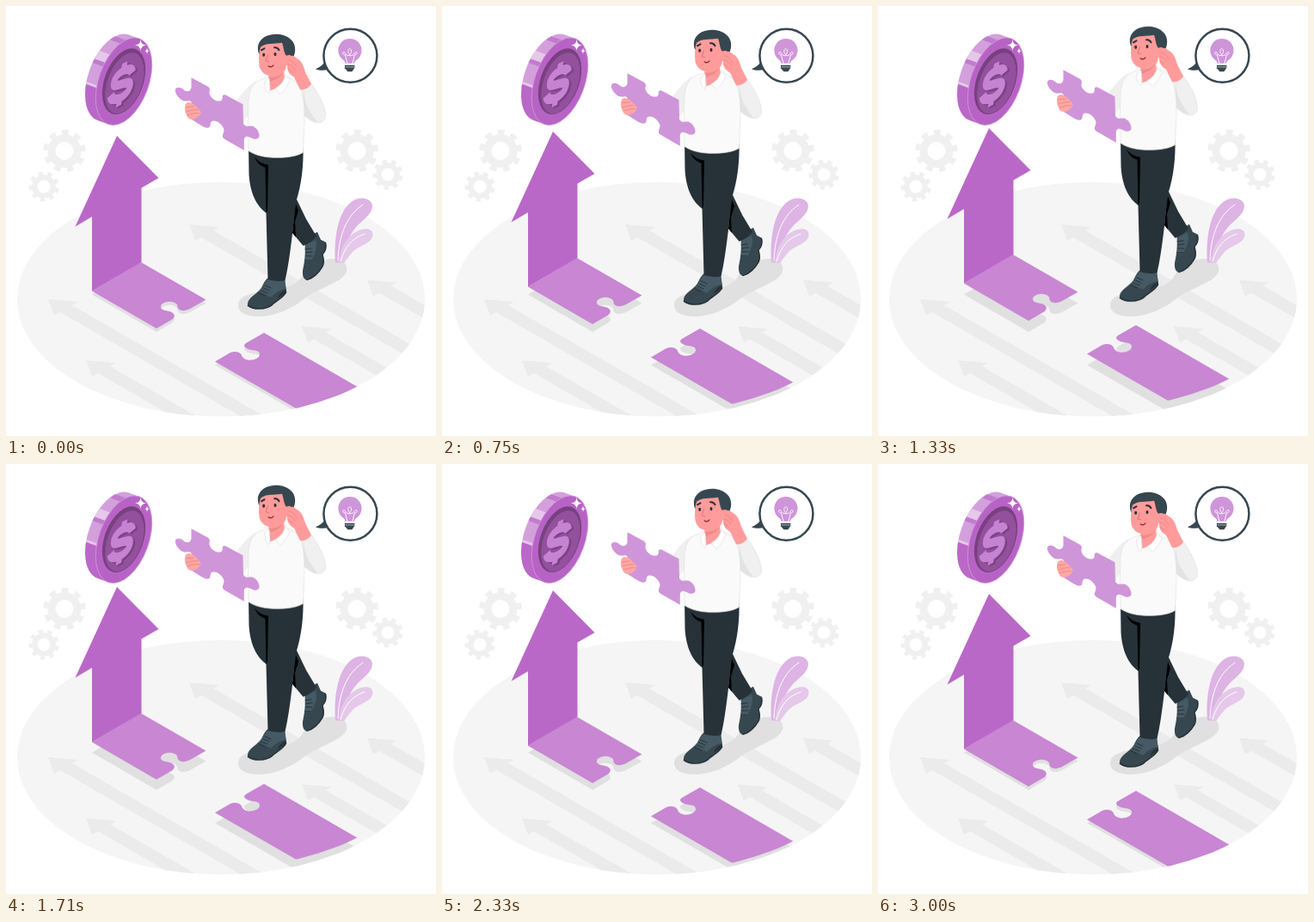
An HTML page for the animation above (3040 ms loop, 500 by 500 pixels).

```html
<!DOCTYPE html>
<html lang="en">
<head>
<meta charset="utf-8">
<title>Missing piece</title>
<style>
  html, body { margin: 0; width: 100%; height: 100%; overflow: hidden; background: #fff; }
  svg { display: block; width: 100vw; height: 100vh; }
  .float { animation: float 3040ms linear infinite; }
  @keyframes float {
    0%, 96%, 100% { transform: translateY(0); }
    48% { transform: translateY(-9.8px); }
  }
  .line { fill: none; stroke-linecap: round; stroke-linejoin: round; }
  .skin { fill: #ff9c9b; }
  .shadow { fill: #e0e0e0; }
  .tile { fill: #c886d3; }
  .main { fill: #ba68c8; }
  .pants { fill: #263238; }
  .slate { fill: #37474f; }
  .lace { fill: #455a64; }
</style>
</head>
<body>
<svg viewBox="0 0 500 500">
  <defs>
    <ellipse id="floor" cx="250" cy="341" rx="237" ry="136.3"/>
    <clipPath id="onFloor"><use href="#floor"/></clipPath>
    <path id="way" d="M0 0L35 3L28 7L428 238L414 246L14 15L7 19Z"/>
    <g id="gear" fill="none" stroke="#f0f0f0">
      <circle r="15" stroke-width="9"/>
      <circle r="21.5" stroke-width="6.5" pathLength="18" stroke-dasharray="1 1"/>
    </g>
    <path id="leftTile" d="M100 331.500L157 298L232.500 341.500L214 352C209 354.500 204 355 201 352.500C198 350 201 348 197 345.500C191 342 181 344.500 180 349C179.500 354 186 354 190 355C196 356.500 198 361 193 364.500L175 375Z"/>
    <path id="rightTile" d="M300 380L470 478.200L360 481L243 413.500L260 403.500C266 401 271 402 273.500 405C274.500 408 276 410.500 281 411.500C288 412.500 295 409.500 295 405C295 401 290 400.500 286 400C279 399 274 395 279 392Z"/>
    <path id="coinSide" d="M0 -53H-13A29 53 0 0 0 -13 53H0Z"/>
    <clipPath id="inSide"><use href="#coinSide"/></clipPath>
    <g id="dollar" fill="none">
      <path stroke-width="11" d="M16 -8C13 -19 -14 -19 -14 -8C-14 4 15 -4 15 8C15 20 -13 20 -17 7"/>
      <path stroke-width="9" d="M0 -26V-15M0 15V26"/>
    </g>
  </defs>

  <rect width="500" height="500" fill="#fff"/>
  <use href="#floor" fill="#f5f5f5"/>
  <g clip-path="url(#onFloor)">
    <g fill="#ebebeb">
      <use href="#way" x="213" y="254"/>
      <use href="#way" x="49" y="341"/>
      <use href="#way" x="93" y="412"/>
      <use href="#way" x="344" y="372.500"/>
      <use href="#way" x="420" y="318.500"/>
    </g>
    <g class="shadow">
      <use href="#leftTile" y="4"/>
      <use href="#rightTile" y="4"/>
    </g>
  </g>
  <path class="shadow" d="M270 348C270 337 286 333 305 331C327 329 340 323 345 313C352 300 367 294 381 294C392 294 398 301 396 309C392 320 368 327 350 338C332 353 312 361 293 361C279 361 270 356 270 348Z"/>

  <use href="#gear" transform="translate(68 168.500) rotate(-18)"/>
  <use href="#gear" transform="translate(44 210) rotate(6) scale(.71)"/>
  <use href="#gear" transform="translate(408 168.500) rotate(-18)"/>
  <use href="#gear" transform="translate(444 196) rotate(6) scale(.71)"/>

  <!-- plant -->
  <path fill="#ddb4e4" d="M383 298C381 270 386 241 400 229C409 221 422 222 425.500 230C428 240 417 247 408 256C397 268 394 283 391 299Z"/>
  <path fill="#e5c8ea" d="M387 299C389 280 396 268 408 262C418 257 427 259 426.500 266C426 276 412 278 404 285C399 290 396 295 393 299Z"/>
  <g class="line" stroke="#fff" stroke-width="1">
    <path d="M386 296C387 268 395 244 415 231"/>
    <path d="M389 297C394 280 402 270 417 265"/>
  </g>

  <!-- coin -->
  <g transform="translate(137 87.700) rotate(20)">
    <use href="#coinSide" fill="#d3a0dc"/>
    <g clip-path="url(#inSide)">
      <path fill="#e5c8ea" d="M-45 -24H0V-13H-45ZM-45 15H0V18H-45Z"/>
      <path fill="#c17bcd" d="M-45 -46H0V-40H-45ZM-45 -13H0V-8H-45Z"/>
      <path class="main" d="M-45 18H0V54H-45Z"/>
    </g>
    <ellipse rx="29" ry="53" fill="#b763c5" stroke="#cf97d9" stroke-width=".8"/>
    <ellipse rx="22.500" ry="40" fill="#78407f"/>
    <ellipse cx="1.500" cy="1.500" rx="20" ry="37" fill="#93509d"/>
  </g>
  <g transform="matrix(.7 -.35 -.14 .97 134.500 91)">
    <use href="#dollar" x="4" y="3" stroke="#7c4385"/>
    <use href="#dollar" stroke="#c683d2"/>
  </g>
  <path fill="#fff" d="M156.500 39Q157 45 163 45.500Q157 46 156.500 52.500Q156 46 150 45.500Q156 45 156.500 39ZM164 48.500Q164.300 52 167 52.300Q164.300 52.600 164 56Q163.700 52.600 161 52.300Q163.700 52 164 48.500Z"/>

  <!-- thought bubble -->
  <g transform="translate(-.6 -.3)">
    <path class="slate" d="M372 64C369 69 365 72 360.500 73.500C365 75.500 371 75.500 376 74Z"/>
    <circle cx="401" cy="58" r="31" fill="#fff" stroke="#37474f" stroke-width="2.500"/>
    <path fill="#cf95d9" d="M395 67C394.500 64 393.500 63.500 392 62.500A13.600 13.600 0 1 1 409 62.500C407.500 63.500 406 64 405.500 67Z"/>
    <path class="line" stroke="#fff" stroke-width=".9" d="M397.500 67L395 57C391 57 392 53 394 54C396 55 395 58 400.300 58C406 58 405 55 407 54C409 53 410 57 406 57L403.500 67M400.300 57C397 54 398.500 50 400.300 50C402 50 403.500 54 400.300 57"/>
    <path class="slate" d="M394.500 69H406V72L403 76.500H398L394.500 72.500Z"/>
    <path stroke="#fff" stroke-width=".6" d="M395 71.200H406"/>
  </g>

  <g class="float">
    <!-- path with its arrow -->
    <use href="#leftTile" class="tile"/>
    <path class="main" d="M129 151L177.500 200L157.500 211.500V298L100 331.500V245L80.500 256.500Z"/>
    <g clip-path="url(#onFloor)"><use href="#rightTile" class="tile"/></g>

    <g transform="translate(0 .8)">
      <!-- back leg and shoe -->
      <path class="slate" d="M347 270L362 262L366 271L372 274C373 280 371.500 285 368 288C369.500 293 371 297 368 302C364 310 357 317 350 318C346 317 344.500 313 345 307C347 297 349 288 347 270Z"/>
      <path class="lace" d="M348 277L360 271C363 279 359 288 355 296L347.500 296C348.500 290 349 284 348 277Z"/>
      <path class="line" stroke="#263238" stroke-width="1.500" d="M371.500 275C373 281 371 285 368 288C369 293 370.500 297 368 302C364 309 357 316 350 317.500"/>
      <path class="line" stroke="#263238" stroke-width="1" d="M348 282L355 281M348.500 286L356 285M348.500 290L356 290M347.500 295L355 295"/>
      <path class="pants" d="M337 222L349 247L361 267C357 272 351 276 345.500 278L333 263Z"/>
      <path fill="#000" d="M336.500 228L340 237L336 250L337 268L333 263Z"/>

      <!-- front leg and shoe -->
      <path class="slate" d="M281 345C282 338 292 334 297 327C300 321 302 316 306 315L324 316L326 330C324 337 314 341 309 347C302 352 288 353 281 348Z"/>
      <path class="lace" d="M294 331C299 326 300 320 305 317L324 318L325.500 328C318 329 312 334 308 338Z"/>
      <path class="line" stroke="#263238" stroke-width="1.700" d="M281.500 347.500C289 353 302 352 309 347C313 342 322 339 325.500 332"/>
      <path class="pants" d="M316 339C318 333 322 330 326 329L325.500 333Z"/>
      <path class="line" stroke="#263238" stroke-width="1" d="M294 333L301 336M296.500 330L304 333M299 327L306 330M301 324L308 327"/>
      <path class="pants" d="M282 160L345.500 164C346 185 344 205 337.500 226C334 252 331 290 324.500 318.500C318 320 310 319 304.500 317L302.500 240C288 229 283.500 211 282.500 195Z"/>
      <path fill="#000" d="M289 175C294 181 299 183 305 184L304 237L302.500 240L301.500 187C296 185 292 182 289 175Z"/>

      <!-- far arm -->
      <path fill="#efefef" d="M292 86C283 90 276 99 269 108L275 135L285 122Z"/>

      <!-- raised arm -->
      <path fill="#f0f0f0" stroke="#e0e0e0" stroke-width=".7" d="M331 84C338 87 341 91 342 97L355.500 90C363 101 370 113 371.500 125C372 136 362 137 354 132L342 122Z"/>
      <path fill="#e3e3e3" d="M346 96C347 110 350 119 362 134C356 134 350 130 345 125Z"/>

      <!-- shirt -->
      <path fill="#fafafa" stroke="#e3e3e3" stroke-width=".7" d="M305 82C293 85 287 89 284 98C281 108 282 119 281.500 130L282 167.500C290 173 301 175.500 315 175.500C329 175.500 339 173.500 345.500 169.500L347 132C347 116 346 99 340 91C336 86 331 83 325 81Z"/>

      <!-- head -->
      <path class="skin" d="M306 75L323 74L324 83C322 91 313 96 306 98L305 84Z"/>
      <path fill="#f08a89" d="M306 82C313 82.500 319 80 322 76C320 82 314 85 306 87Z"/>
      <path fill="#fff" stroke="#e0e0e0" stroke-width=".7" d="M306 83L301 87C300 94 303 99 305.500 101L307 96ZM325 79L330 86C327 93 323 98 319 102L313 95C319 92 323 87 325 79Z"/>
      <path class="slate" d="M294 55C291 46 294 39 302 34.500C311 30 326 31 333 40C338 47 337 56 331 64L325 64L320 46Z"/>
      <path class="skin" d="M296 47C302 42 311 43.500 321 42C323 47 323 54 326 57C330 55 334 57 333 63C332 67 328 69 326 68C326 75 320 80 311 81C302 81 296 76 294.500 69C293.500 61 294 53 296 47Z"/>
      <g fill="#263238">
        <ellipse cx="299.700" cy="56" rx="1.500" ry="2.100"/>
        <ellipse cx="313" cy="55.300" rx="1.500" ry="2.100"/>
      </g>
      <path class="line" stroke="#263238" stroke-width="2" d="M297 50.500L300.500 48.500M312 47.500C314.500 47 316.500 48.500 317.500 50.500"/>
      <path class="line" stroke="#e8706f" stroke-width="1" d="M304.500 56L302 63L305.500 64"/>
      <path class="line" stroke="#8c3038" stroke-width="1.200" d="M305 69C307 70.500 309.500 70 311 68"/>

      <!-- raised hand -->
      <path class="skin" d="M328 60C330 56 334 56 338 60C344 63 346 69 348 76L355 90C352 95 346 97 342 96.500L335 82C330 79 327 75 327 70C326 67 327 63 328 60Z"/>
      <path class="line" stroke="#e8807f" stroke-width=".8" d="M329 62C333 63 336 66 338 70M328 67C331 67 334 70 336 73M328 72L333 76"/>

      <!-- held piece -->
      <path fill="#cf95d9" d="M215.500 82.500L234 92.500C239 95.500 236 98 236.500 101C238 107 245 111 250 109.500C254 107 249 102 255 102.500L275.500 113.500L276 136C279 141 283 138 287 139C292 141 295 147 294.500 151C293 155 288 154.500 285 152.500C281 150 277 150 276.800 155V167L255 154.500C249 151 253.500 148 253.500 143C252 137 245 131.500 240 133C236 135 239 139 236 140.500C233 142 228 139 225 137L215.500 131L216 112C214 107 210 111 205 109C200 106 196 100 197 96C199 92.500 204 94 207 97C211 100 215 98 215.500 94Z"/>

      <!-- holding hand -->
      <path fill="#ffa8a4" d="M209 113C211 110 216 111 219 114L226 121C228 125 224 128 220 130C215 133 211 130 210 126C208 123 207 117 209 113Z"/>
      <path class="line" stroke="#e8807f" stroke-width=".8" d="M210 117L218 116M210 122C214 121 219 119 223 120M211 126C215 125 220 123 225 124"/>
    </g>
  </g>
</svg>
</body>
</html>
```
